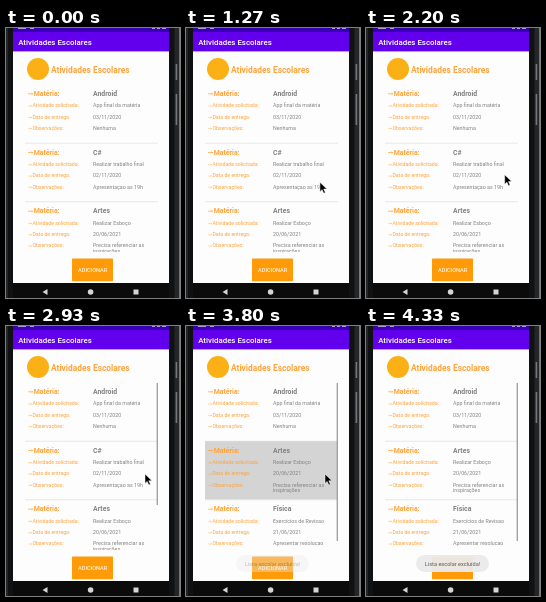
An HTML page for the animation above (4540 ms loop, 174 px wide and 270 px high).

```html
<!DOCTYPE html>
<html lang="pt">
<head>
<meta charset="utf-8">
<style>
html, body { margin: 0; width: 100%; height: 100%; overflow: hidden; background: #252628; }
svg { display: block; width: 100vw; height: 100vh; font-family: Roboto, sans-serif; }
.bold { font-weight: 700; }
.label { fill: #ffa33c; }
.value { fill: #828282; }
</style>
</head>
<body>
<svg viewBox="0 0 174 270" preserveAspectRatio="none">
  <defs>
    <clipPath id="view"><rect x="19" y="54" width="134" height="170"/></clipPath>
  </defs>
  <rect width="174" height="270" fill="#252628"/>
  <g fill="#77777b">
    <rect x="169.6" y="36" width="1.6" height="16"/>
    <rect x="169.6" y="66" width="1.6" height="31"/>
    <rect x="173" width="1" height="270"/>
  </g>
  <rect x="2" width="166.5" height="270" fill="#101113"/>
  <rect x="7" width="156" height="256" fill="#fdfdfd"/>
  <rect x="7" width="156" height="23.4" fill="#6200ee"/>
  <rect x="7" width="156" height="4" fill="#3700b3"/>
  <path d="M12 .4h8M24 .4h4M146 .4h3M151 .4h3M156 .4h4" stroke="#ddd" stroke-width=".8"/>
  <rect x="7" y="255" width="156" height="15" fill="#0b0b0c"/>
  <g fill="#d5d5d5">
    <path d="M41.5 261v6l-5-3z"/>
    <circle cx="84.6" cy="264" r="2.8"/>
    <rect x="127.5" y="261.5" width="5" height="5"/>
  </g>
  <text x="12.2" y="16.7" font-size="7.9" font-weight="500" fill="#fff">Atividades Escolares</text>
  <circle cx="32" cy="41" r="11" fill="#fbb116"/>
  <text x="45" y="44.8" font-size="8.4" class="bold label">Atividades Escolares</text>

  <g clip-path="url(#view)">
    <rect id="press" x="19" y="115" width="133" height="58.5" fill="#d4d4d4"/>
    <path d="M19 115.2H152M19 173.8H152" stroke="#dedede" stroke-width=".7"/>
    <g id="before"></g>
    <g id="after"></g>
    <rect id="bar" x="150.6" y="57" width="1.4" fill="#a3a3a3"/>
  </g>

  <rect x="66" y="230.4" width="41" height="22.8" rx=".8" fill="#ff9a08"/>
  <text x="86.7" y="243.8" font-size="5.6" font-weight="500" text-anchor="middle" fill="#fff3df">ADICIONAR</text>
  <g id="toast">
    <rect x="50" y="229" width="73" height="17" rx="8.5" fill="#ebebeb"/>
    <text x="86.5" y="239.5" font-size="5.6" text-anchor="middle" fill="#555">Lista escolar excluída!</text>
  </g>
  <path id="cursor" d="M0 0V9.4L2.2 7.4L3.8 11L5.4 10.3L3.8 6.8H7z" fill="#000" stroke="#fff" stroke-width=".5"/>
</svg>
<script>
const LOOP = 4540;
const PITCH = 58.7;
const $ = id => document.getElementById(id);

const android = ["Android", "App final da matéria", "03/11/2020", "Nenhuma"];
const csharp = ["C#", "Realizar trabalho final", "02/11/2020", "Apresentaçao as 19h"];
const artes = ["Artes", "Realizar Esboço", "20/06/2021", "Precisa referenciar as", "inspirações"];
const fisica = ["Física", "Exercícios de Revisao", "21/06/2021", "Apresentar resolucao"];
const labels = ["Matéria:", "Atividade solicitada:", "Data de entrega:", "Observações:"];
const lineY = [67.8, 79.3, 90.7, 101.9, 107.6];

function put(parent, x, y, size, cls, str) {
  const t = document.createElementNS("http://www.w3.org/2000/svg", "text");
  t.setAttribute("x", x);
  t.setAttribute("y", y);
  t.setAttribute("font-size", size);
  t.setAttribute("class", cls);
  t.textContent = str;
  parent.append(t);
}

function arrow(parent, y, len, width) {
  const p = document.createElementNS("http://www.w3.org/2000/svg", "path");
  p.setAttribute("d", `M22 ${y}h${len}m-1 -.9l1 .9l-1 .9`);
  p.setAttribute("fill", "none");
  p.setAttribute("stroke", "#ffa33c");
  p.setAttribute("stroke-width", width);
  parent.append(p);
}

function fill(list, items) {
  items.forEach((item, row) => item.forEach((value, i) => {
    const y = lineY[i] + row * PITCH;
    const head = i === 0;
    const weight = head ? "bold " : "";
    if (labels[i]) {
      arrow(list, y - (head ? 2 : 1.3), head ? 4.6 : 3.6, head ? 0.7 : 0.4);
      put(list, head ? 27.8 : 26.4, y, head ? 6.9 : 5.2, weight + "label", labels[i]);
    }
    put(list, 87, y, head ? 6.9 : 5.3, weight + "value", value);
  }));
}
fill($("before"), [android, csharp, artes]);
fill($("after"), [android, artes, fisica]);

// time, x, y of the pointer tip
const path = [
  [900, 174, 206], [1400, 126, 144], [1670, 126, 142.5], [1930, 136, 137],
  [2270, 139, 148], [4000, 139, 148], [4200, 152, 155]
];
const ramp = (t, a, b) => Math.min(1, Math.max(0, (t - a) / (b - a)));

function pointer(t) {
  const k = path.findIndex(p => p[0] > t);
  if (k < 1) return null;
  const [t0, x0, y0] = path[k - 1], [t1, x1, y1] = path[k];
  const u = ramp(t, t0, t1), e = u * u * (3 - 2 * u);
  return [x0 + (x1 - x0) * e, y0 + (y1 - y0) * e];
}

function show(id, opacity) {
  $(id).setAttribute("opacity", opacity);
}

function draw(t) {
  const removed = t >= 3530;
  show("before", removed ? 0 : 1);
  show("after", removed ? 1 : 0);
  show("press", ramp(t, 2930, 3270) * (1 - ramp(t, 4000, 4270)));
  show("bar", t >= 2930 ? 1 : 0);
  $("bar").setAttribute("height", removed ? 158 : 122);
  show("toast", 0.95 * ramp(t, 3670, 4000));
  const tip = pointer(t);
  show("cursor", tip ? 1 : 0);
  if (tip) $("cursor").setAttribute("transform", `translate(${tip[0]} ${tip[1]})`);
}

const start = performance.now();
function tick() {
  draw((performance.now() - start) % LOOP);
  requestAnimationFrame(tick);
}
tick();
</script>
</body>
</html>
```
